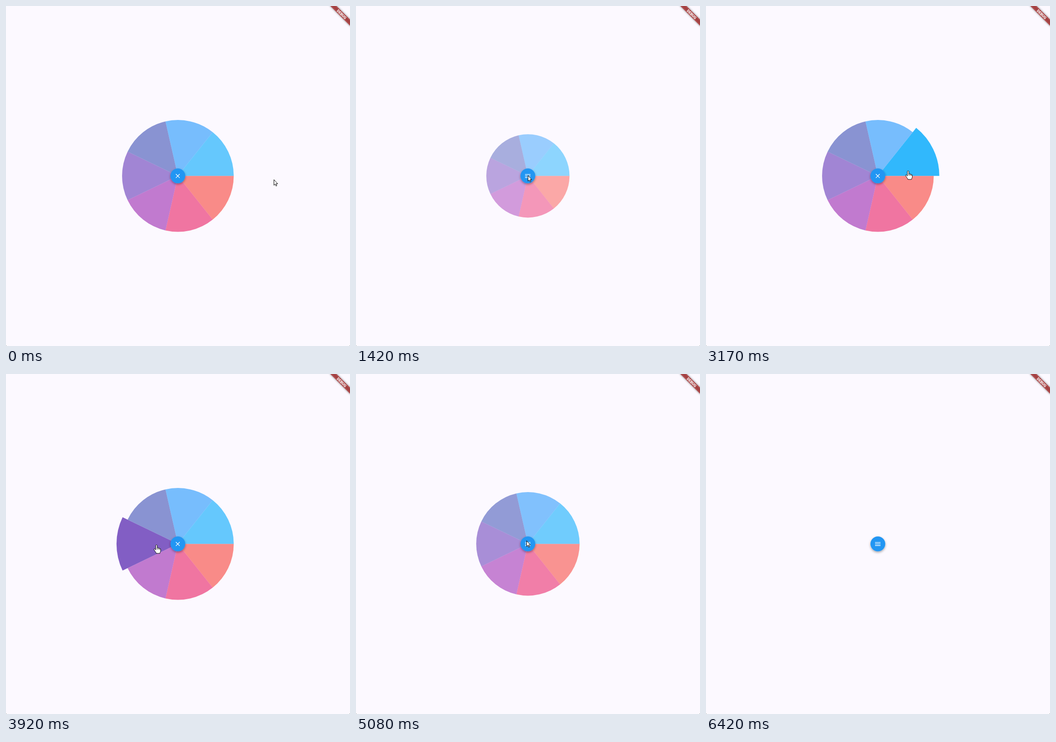
Write an HTML page that moves like this. It is 753 px wide and 743 px high and loops after 6.58 s.

```html
<!DOCTYPE html>
<html lang="en">
<head>
<meta charset="utf-8">
<title>Radial menu</title>
<style>
  html, body { margin: 0; width: 100%; height: 100%; overflow: hidden; background: #fcf9ff; }
  svg { display: block; width: 753px; height: 743px; }
  .banner { font: 900 10.2px Roboto, "Open Sans", sans-serif; fill: #fff; text-anchor: middle; }
  .cursor { fill: #fff; stroke: #000; stroke-width: 1; }
</style>
</head>
<body>
<svg viewBox="0 0 753 743">
  <defs>
    <filter id="blur" x="-30%" y="-150%" width="160%" height="400%">
      <feGaussianBlur stdDeviation="2.8"/>
    </filter>
    <filter id="lift" x="-50%" y="-50%" width="200%" height="200%">
      <feDropShadow dx="0" dy="2.2" stdDeviation="2.6" flood-color="#000" flood-opacity=".36"/>
    </filter>
  </defs>

  <g id="wheel"></g>

  <circle cx="376.2" cy="371.2" r="16.2" fill="#2196f3" filter="url(#lift)"/>
  <g transform="translate(376 371.4) scale(.6667)" fill="none" stroke="#fff" stroke-width="2">
    <path id="menu" d="M-9-5H9M-9 0H9M-9 5H9"/>
    <path id="close" d="M-6.3-6.3 6.3 6.3M6.3-6.3-6.3 6.3"/>
  </g>

  <g transform="translate(754.1 -1.1) rotate(45) scale(.8)">
    <rect x="-40" y="28" width="80" height="12" fill-opacity=".5" filter="url(#blur)"/>
    <rect x="-40" y="28" width="80" height="12" fill="#b71c1c" fill-opacity=".627"/>
    <text class="banner" y="37.6">DEBUG</text>
  </g>

  <path d="M0 742h1v1h-1zM752 742h1v1h-1z" fill="#777"/>

  <path id="arrow" class="cursor" d="M0 0V12.4L2.7 9.7 4.6 14 6.4 13.2 4.6 9H8.3Z"/>
  <g id="hand" class="cursor">
    <path d="M-1.7 1.2C-1.7-.6 1.5-.6 1.5 1.2V6.6C1.9 5.4 4.3 5.6 4.3 7.3 5 6.4 6.9 6.7 6.9 8.2 7.7 7.5 9 8 9 9.5V13C9 15.5 7.5 16 7.3 18.5H-.6C-.9 16.5-2.7 15-3.8 13L-5.6 10.2C-6.4 8.8-4.4 7.8-3.2 9.2L-1.7 11Z"/>
    <path d="M1.5 6.6V10M4.3 7.3V10M6.9 8.2V10.4" fill="none"/>
  </g>
</svg>

<script>
const LOOP = 6580, STEP = 1000 / 12;
const CX = 376.3, CY = 371.3, RADIUS = 122.2, POP = 1.1, BUTTON = 16.2;
const TURN = 2 * Math.PI;
// clockwise from three o'clock
const COLORS = ['#f8433a', '#e91e63', '#9c27b0', '#673ab7', '#3f51b5', '#2196fc', '#03a9fc'];
const SLICE = TURN / COLORS.length;

// moments, in steps
const FIRST_CLOSE = 15, REOPEN = 30, GROW = 31, LAST_CLOSE = 60;
const ARRIVE = 12, LEAVE = 61, EXIT = 73;

// the tour around the wheel: step, counterclockwise degrees, distance from the hub
const TOUR = [
  { k: 36, deg: 0, r: 2 },
  { k: 38, deg: 9.5, r: 67 },
  { k: 47, deg: 182, r: 47 },
  { k: 52, deg: 315, r: 62 },
  { k: 54, deg: 372, r: 64 },
  { k: 58, deg: 405, r: 6 }
];

const $ = id => document.getElementById(id);
const show = (el, on) => el.setAttribute('visibility', on ? 'visible' : 'hidden');
const clamp = v => Math.min(1, Math.max(0, v));
const lerp = (a, b, f) => a + (b - a) * f;
const span = (k, from, to) => clamp((k - from) / (to - from));
const at = (r, a) => `${r * Math.cos(a)} ${r * Math.sin(a)}`;

const slices = COLORS.map((color, i) => {
  const el = document.createElementNS('http://www.w3.org/2000/svg', 'path');
  el.setAttribute('d', `M0 0L${at(RADIUS, i * SLICE)}A${RADIUS} ${RADIUS} 0 0 1 ${at(RADIUS, (i + 1) * SLICE)}Z`);
  el.setAttribute('fill', color);
  $('wheel').append(el);
  return el;
});

// a slightly raised arc from the right onto the button
function approach(k) {
  const p = span(k, 5, ARRIVE), f = Math.sin(p * TURN / 4);
  return [lerp(586, 376, f), lerp(379, 370, f) - 8 * Math.sin(p * TURN / 2)];
}

function tour(k) {
  const i = TOUR.findIndex(p => p.k >= k);
  const a = TOUR[i - 1], b = TOUR[i], f = span(k, a.k, b.k);
  const angle = lerp(a.deg, b.deg, f) * TURN / 360, r = lerp(a.r, b.r, f);
  return [CX + r * Math.cos(angle), CY - r * Math.sin(angle)];
}

// sideways speed fades while the fall stays even
function leave(k) {
  const p = span(k, LEAVE, EXIT);
  return [373 + 325 * Math.sin(p * TURN / 4), 364 + 380 * p];
}

function pointer(k) {
  if (k <= TOUR[0].k) return approach(k);
  return k < TOUR[TOUR.length - 1].k ? tour(k) : leave(k);
}

// ease out when opening, the same curve reversed when closing
function openness(k) {
  const ease = from => clamp((k - from + .17) / 4.3);
  if (k < REOPEN) return 1 - ease(FIRST_CLOSE) ** 2;
  if (k < LAST_CLOSE) return 1 - (1 - ease(GROW)) ** 2;
  return 1 - ease(LAST_CLOSE) ** 2;
}

function hoveredSlice(x, y) {
  const dx = x - CX, dy = y - CY, dist = Math.hypot(dx, dy);
  if (dist > RADIUS || dist < BUTTON) return -1;
  return Math.floor(((Math.atan2(dy, dx) + TURN) % TURN) / SLICE);
}

function draw(now) {
  // the motion advances at 12 steps per second
  const k = Math.floor((now % LOOP + 5) / STEP);
  const open = k < FIRST_CLOSE || (k >= REOPEN && k < LAST_CLOSE);
  const size = openness(k);
  const [x, y] = pointer(k);
  const hover = open && size === 1 ? hoveredSlice(x, y) : -1;

  slices.forEach((el, i) => {
    const scale = size * (i === hover ? POP : 1);
    el.setAttribute('transform', `translate(${CX} ${CY}) scale(${scale})`);
    el.setAttribute('fill-opacity', size * (i === hover ? .81 : .6));
  });

  show($('close'), open);
  show($('menu'), !open);
  show($('hand'), hover >= 0);
  show($('arrow'), hover < 0);
  for (const id of ['hand', 'arrow'])
    $(id).setAttribute('transform', `translate(${Math.round(x) + .5} ${Math.round(y) + .5})`);
}

const start = performance.now();
function tick() {
  draw(performance.now() - start);
  requestAnimationFrame(tick);
}
tick();
</script>
</body>
</html>
```
